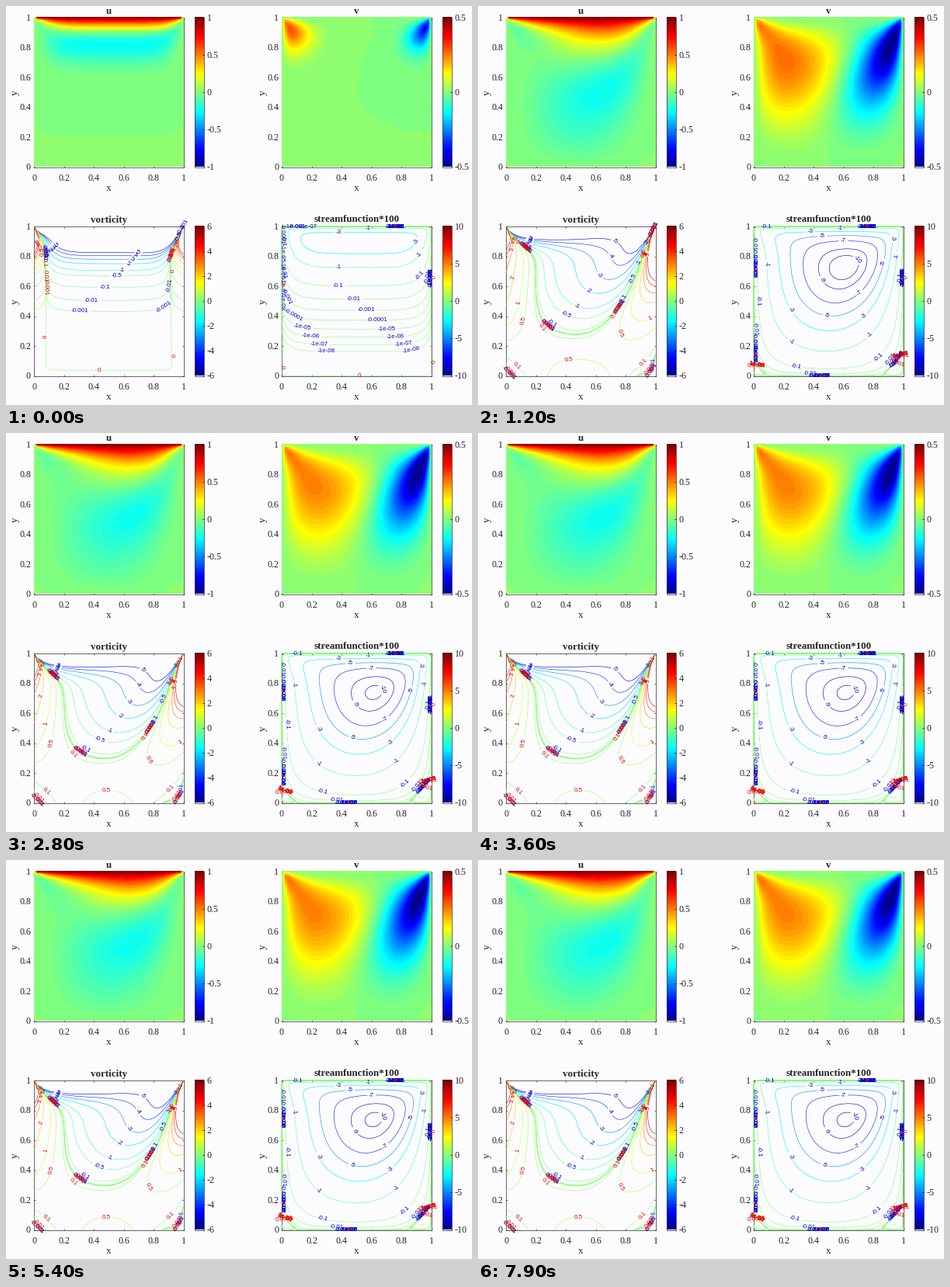
Recreate the animation shown at these times as a matplotlib script. Size 600 px wide and 514 px high, loop 8000 ms.

```python
import numpy as np
import matplotlib.pyplot as plt
from matplotlib.animation import FuncAnimation
from matplotlib.collections import LineCollection

W, H, DPI = 600, 514, 100
PT = 72 / DPI
FRAMES, INTERVAL = 80, 100

# Lid-driven cavity, vorticity / streamfunction, one relaxation sweep per step
N, NU, STEPS = 51, 0.01, 95
STEP = 1 / (N - 1)
R = 0.23
DT = R * STEP**2 / NU


def velocity(psi):
    u, v = np.zeros_like(psi), np.zeros_like(psi)
    u[1:-1, 1:-1] = (psi[2:, 1:-1] - psi[:-2, 1:-1]) / (2 * STEP)
    v[1:-1, 1:-1] = (psi[1:-1, :-2] - psi[1:-1, 2:]) / (2 * STEP)
    u[-1, 1:-1] = 1
    return u, v


def around(f):
    return f[2:, 1:-1] + f[:-2, 1:-1] + f[1:-1, 2:] + f[1:-1, :-2]


def set_walls(w, psi):
    k = -2 / STEP**2
    w[0, 1:-1] = k * psi[1, 1:-1]
    w[-1, 1:-1] = k * (psi[-2, 1:-1] + STEP)
    w[1:-1, 0] = k * psi[1:-1, 1]
    w[1:-1, -1] = k * psi[1:-1, -2]


def simulate():
    psi, w = np.zeros((N, N)), np.zeros((N, N))
    core = (slice(1, -1), slice(1, -1))
    states = []
    for _ in range(FRAMES):
        for _ in range(STEPS):
            set_walls(w, psi)
            u, v = velocity(psi)
            wx = (w[1:-1, 2:] - w[1:-1, :-2]) / (2 * STEP)
            wy = (w[2:, 1:-1] - w[:-2, 1:-1]) / (2 * STEP)
            flow = u[core] * wx + v[core] * wy
            w[core] += R * (around(w) - 4 * w[core]) - DT * flow
            psi[core] += R * (around(psi) - 4 * psi[core] + STEP**2 * w[core])
        set_walls(w, psi)
        states.append((*velocity(psi), w.copy(), 100 * psi))
    return states


# 64-step jet colours
def ramp(center):
    k = np.arange(1, 65)
    return np.clip((24 - np.abs(k - center)) / 16, 0, 1)


JET = np.stack([ramp(48), ramp(32), ramp(16)], axis=1)


def jet(f, limit):
    # single precision: tiny negative values count as zero
    q = np.float32(0.5) + np.asarray(f / (2 * limit), dtype=np.float32)
    return JET[np.clip(np.floor(q * 64).astype(int), 0, 63)]


SAMPLE = np.maximum(0, 1 - np.abs(np.linspace(0, N - 1, 193)[:, None] - np.arange(N)))


def shade(f, limit):
    return jet(SAMPLE @ f @ SAMPLE.T, limit)[::-1]


# Stage in pixel coordinates
SIZE = 192.5
LEFT, RIGHT, TOP, BOTTOM = 36, 355, 15, 284
INK = "#262626"

fig = plt.figure(figsize=(W / DPI, H / DPI), dpi=DPI, facecolor="#fcfcfe")
ax = fig.add_axes([0, 0, 1, 1])
ax.axis("off")


def serif(x, y, s, size=12, **kw):
    ax.text(x, y, s, family="Liberation Serif", size=size * PT, color=INK, **kw)


def frame_box(x, y, w, h, ticks=(), zorder=2):
    segs = [[(x, y), (x + w, y), (x + w, y + h), (x, y + h), (x, y)]]
    for t in ticks:
        px, py = x + t * w, y + h - t * h
        segs += [[(px, y + h), (px, y + h - 2)], [(px, y), (px, y + 2)],
                 [(x, py), (x + 2, py)], [(x + w, py), (x + w - 2, py)]]
    ax.add_collection(LineCollection(segs, colors=INK, linewidths=0.5, zorder=zorder))


def panel(x, y, title, limit, bar_ticks):
    ticks = np.arange(6) / 5
    frame_box(x, y, SIZE, SIZE, ticks, zorder=0.5)
    for t in ticks:
        serif(x + t * SIZE, y + SIZE + 17.5, f"{t:g}", ha="center")
        serif(x - 4, y + SIZE * (1 - t) + 3.7, f"{t:g}", ha="right")
    serif(x + SIZE / 2, y + SIZE + 30.5, "x", 13.2, ha="center")
    serif(x - 24.5, y + SIZE / 2, "y", 13.2, ha="center", va="center", rotation=90)
    serif(x + SIZE / 2, y - 5.5, title, 13, ha="center", weight="bold")

    bx = x + 206.5
    ax.imshow(JET[::-1, None], extent=(bx, bx + 12, y + SIZE, y), aspect="auto",
              interpolation="nearest", zorder=1)
    frame_box(bx, y, 12, SIZE)
    for t in bar_ticks:
        ty = y + SIZE * (0.5 - t / (2 * limit))
        ax.plot([bx + 10, bx + 12], [ty, ty], color=INK, lw=0.5)
        serif(bx + 16, ty + 3.7, f"{t:g}")


panel(LEFT, TOP, "u", 1, (-1, -0.5, 0, 0.5, 1))
panel(RIGHT, TOP, "v", 0.5, (-0.5, 0, 0.5))
panel(LEFT, BOTTOM, "vorticity", 6, range(-6, 7, 2))
panel(RIGHT, BOTTOM, "streamfunction*100", 10, range(-10, 11, 5))


def heat_map(x, y):
    return ax.imshow(np.zeros((2, 2, 3)), extent=(x, x + SIZE, y + SIZE, y),
                     aspect="auto", interpolation="nearest", zorder=1)


heat_u, heat_v = heat_map(LEFT, TOP), heat_map(RIGHT, TOP)
ax.set_xlim(0, W)
ax.set_ylim(H, 0)
ax.autoscale(False)


# Labelled contour lines
SPACING, LEAD, FONT = 109, 37, 8


class Contours:
    def __init__(self, x, y, limit, levels, starts=None, zero=0.0):
        self.x, self.y, self.limit = x, y, limit
        self.levels = sorted(levels)
        self.cuts = [lv if lv else zero for lv in self.levels]
        self.starts = starts or {}
        self.lines = LineCollection([], linewidths=0.42, zorder=3)
        ax.add_collection(self.lines, autolim=False)
        self.texts = []
        g = np.linspace(0, SIZE, N)
        self.gx, self.gy = x + g, y + SIZE - g

    def orient(self, p, level):
        closed = len(p) > 3 and np.allclose(p[0], p[-1])
        if closed:
            p = p[:-1]
            q = np.roll(p, -1, axis=0)
            if np.sum(p[:, 0] * q[:, 1] - q[:, 0] * p[:, 1]) < 0:
                p = p[::-1]
            sx, sy = self.starts.get(level, (0.76, 1))
            start = (self.x + sx * SIZE, self.y + (1 - sy) * SIZE)
            p = np.roll(p, -np.argmin(np.hypot(*(p - start).T)), axis=0)
            p = np.vstack([p, p[:1]])
        elif p[0, 0] > p[-1, 0]:
            p = p[::-1]
        return p, closed

    def trace(self, p, level):
        p, closed = self.orient(p, level)
        s = np.r_[0, np.cumsum(np.hypot(*np.diff(p, axis=0).T))]
        length = s[-1]
        if length < 1:
            return p

        def at(t):
            t = np.mod(t, length) if closed else np.clip(t, 0, length)
            return np.array([np.interp(t, s, p[:, 0]), np.interp(t, s, p[:, 1])])

        t = np.append(np.arange(0, length, 1.5), length)
        line = np.column_stack([np.interp(t, s, c) for c in p.T])
        if length < 20:
            return line
        if closed:
            spots = SPACING * np.arange(max(1, int(length // SPACING)))
        else:
            spots = np.arange(min(LEAD, length / 2), length, SPACING)
        word = f"{level:g}"
        for spot in spots:
            gap = np.abs(t - spot)
            if closed:
                gap = np.minimum(gap, length - gap)
            line[gap < 2 * len(word) + 1] = np.nan
            dx, dy = at(spot + 4) - at(spot - 4)
            angle = (np.degrees(np.arctan2(-dy, dx)) + 90) % 180 - 90
            self.texts.append(ax.text(
                *at(spot), word, family="Liberation Sans", size=FONT * PT,
                color="#0000c8" if level < 0 else "#e60000", rotation=angle,
                rotation_mode="anchor", ha="center", va="center", zorder=4))
        return line

    def update(self, f):
        for t in self.texts:
            t.remove()
        self.texts = []
        cs = ax.contour(self.gx, self.gy, f, levels=self.cuts)
        groups = cs.allsegs
        cs.remove()
        segs, colors = [], []
        for level, group in zip(self.levels, groups):
            for p in group:
                if len(p) > 1:
                    segs.append(self.trace(np.asarray(p), level))
                    colors.append(jet(np.float64(level), self.limit))
        self.lines.set_segments(segs)
        self.lines.set_color(colors)


def both_signs(values):
    return [0, *values, *(-v for v in values)]


vort = Contours(LEFT, BOTTOM, 6, both_signs([0.001, 0.01, 0.1, 0.5, 1, 2, 3, 4, 5]))
stream = Contours(
    RIGHT, BOTTOM, 10,
    both_signs([float(f"1e-{k}") for k in range(1, 9)] + [1, 3, 5, 7, 9, 10]),
    starts={-10: (0.67, 0.76), -9: (0.48, 0.66), -7: (0.6, 0.9),
            -5: (0.47, 0.88), -3: (0.38, 0.96), -1: (0.58, 0.98)},
    zero=-1e-30)

STATES = simulate()


def draw(k):
    u, v, w, psi = STATES[k]
    heat_u.set_data(shade(u, 1))
    heat_v.set_data(shade(v, 0.5))
    vort.update(w)
    stream.update(psi)
    return []


anim = FuncAnimation(fig, draw, frames=FRAMES, interval=INTERVAL,
                     repeat=True, repeat_delay=0, blit=False)
plt.show()
```
